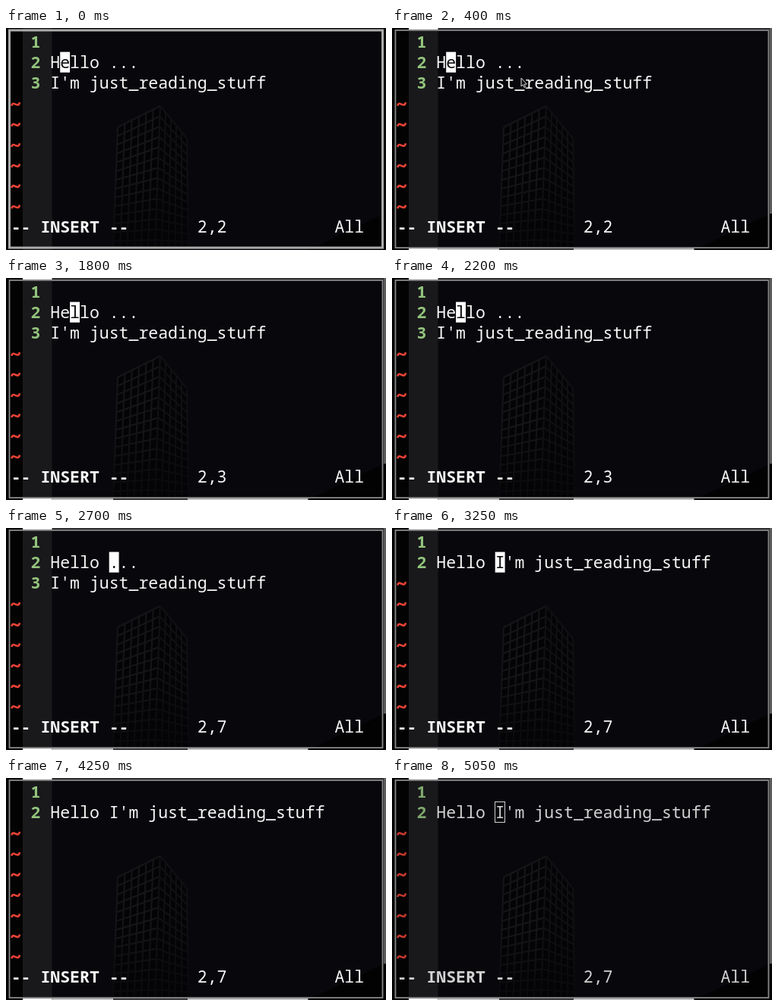
An HTML page with a canvas for the animation above (5.1 s loop, 500x293 px).

```html
<!DOCTYPE html>
<html>
<head>
<meta charset="utf-8">
<style>
html, body { margin: 0; width: 100%; height: 100%; overflow: hidden; background: #08070c; }
canvas { display: block; }
</style>
</head>
<body>
<canvas id="stage" width="500" height="293"></canvas>
<script>
const ctx = document.getElementById('stage').getContext('2d');
const LOOP = 5100, CELL = 12.9, ROW = 27.1, LEFT = 6.7, TOP = 5, TEXT_COL = 4;
const GREEN = '#93c47d', RED = '#ea4335', WHITE = '#f8f8f8';

const clamp = v => Math.max(0, Math.min(1, v));
const mix = (a, b, k) => a + (b - a) * k;
const since = (times, t) => times.filter(s => t >= s).length;

function rect(color, x, y, w, h) {
  ctx.fillStyle = color;
  ctx.fillRect(x, y, w, h);
}

function polygon(points, fill, stroke) {
  ctx.beginPath();
  points.forEach(([x, y]) => ctx.lineTo(x, y));
  ctx.closePath();
  ctx.fillStyle = fill;
  ctx.fill();
  if (stroke) {
    ctx.strokeStyle = stroke;
    ctx.lineWidth = 1;
    ctx.stroke();
  }
}

function write(text, col, row, color, bold) {
  ctx.font = `${bold ? 700 : 400} 21.5px "Noto Sans Mono", monospace`;
  ctx.fillStyle = color;
  ctx.fillText(text, LEFT + col * CELL, TOP + row * ROW + 21);
}

// Heavy tilde that marks the rows below the text
function tilde(row) {
  const y = TOP + row * ROW + 14;
  ctx.strokeStyle = RED;
  ctx.lineWidth = 2.6;
  ctx.beginPath();
  ctx.moveTo(7.4, y + 2.4);
  ctx.bezierCurveTo(9, y - 6, 16, y + 7, 18, y - 2.2);
  ctx.stroke();
}

// One side of the tower: a window grid between two upright edges
function face([ax, ay, ax2], [bx, by, bx2], cols, color) {
  const bottom = 293;
  const at = (u, v) => [
    mix(mix(ax, ax2, v), mix(bx, bx2, v), u),
    mix(mix(ay, by, u), bottom, v)
  ];
  polygon([at(0, 0), at(1, 0), at(1, 1), at(0, 1)], '#040406');
  const fade = ctx.createLinearGradient(0, 103, 0, 293);
  fade.addColorStop(0, color);
  fade.addColorStop(0.5, color);
  fade.addColorStop(1, '#09080a');
  ctx.strokeStyle = fade;
  ctx.lineWidth = 2;
  ctx.beginPath();
  const line = (p, q) => { ctx.moveTo(...p); ctx.lineTo(...q); };
  for (let i = 0; i <= cols; i++) line(at(i / cols, 0), at(i / cols, 1));
  for (let i = 0; i <= 14; i++) line(at(0, i / 14), at(1, i / 14));
  ctx.stroke();
}

function drawBackdrop(t) {
  rect('#08070c', 0, 0, 500, 293);
  rect('#030304', 0, 0, 22, 293);
  rect('#19191b', 22, 0, 38.5, 293);
  face([147, 131, 141], [203, 103, 196], 6, '#161416');
  face([203, 103, 196], [238, 146, 240], 5, '#100f11');
  polygon([[398, 293], [500, 244], [500, 293]], '#020203');

  // Bright wallpaper shows around the window
  const glow = 1 - clamp((t - 100) / 150);
  ctx.globalAlpha = 1 - glow;
  rect('#3a3a3c', 60, 0, 440, 1.5);
  rect('#ffffff', 22, 0, 38.5, 2);
  rect('#ffffff', 22, 291, 38.5, 2);
  rect('#c4c4c6', 60.5, 291, 337, 2);
  rect('#3c3c3e', 141, 291, 98, 2);
  rect('#5c5c5e', 497, 0, 3, 245);
  ctx.globalAlpha = 1;
  const shade = Math.round(mix(136, 172, glow));
  ctx.strokeStyle = `rgb(${shade},${shade},${shade})`;
  ctx.lineWidth = mix(1.8, 3, glow);
  ctx.strokeRect(4.5, 3, 491, 287);
}

function drawCursor(col, char, t) {
  const x = LEFT + (TEXT_COL + col - 1) * CELL, y = TOP + ROW;
  if (t >= 4700) {
    ctx.strokeStyle = WHITE;
    ctx.lineWidth = 1;
    ctx.strokeRect(Math.round(x) - 0.5, 31.5, 13, 27);
  } else if (!(t >= 1200 && t < 1800) && !(t >= 3800 && t < 4400)) {
    rect('#ffffff', x, y - 0.5, CELL, ROW);
    write(char, TEXT_COL + col - 1, 1, '#0b0a0e');
  }
}

// Pointer stops: time, x, y
const path = [
  [150, 262, 128], [400, 170, 66], [650, 205, 72], [900, 160, 60],
  [1150, 125, 47], [1350, 125, 47], [1700, 88, 44], [1800, 88, 44]
];

function drawPointer(t) {
  const i = path.findIndex(([time]) => time > t);
  if (i < 1) return;
  const [t0, x0, y0] = path[i - 1], [t1, x1, y1] = path[i];
  let k = (t - t0) / (t1 - t0);
  k = k * k * (3 - 2 * k);
  ctx.save();
  ctx.translate(mix(x0, x1, k), mix(y0, y1, k));
  polygon([[0, 0], [0, 11], [2.4, 8.8], [4, 12.5], [5.7, 11.7], [4.1, 8.2], [7.3, 8]], '#111114', '#d8d8d8');
  ctx.restore();
}

function draw(t) {
  drawBackdrop(t);
  const column = t < 1800 ? 2 : 3 + since([2400, 2500, 2600, 2700], t);
  const deleted = since([2850, 2950, 3050], t);
  const joined = t >= 3200;
  const second = "I'm just_reading_stuff";
  const first = 'Hello ' + '...'.slice(deleted) + (joined ? second : '');
  const lines = joined ? ['', first] : ['', first, second];

  ctx.globalAlpha = 1 - 0.16 * clamp((t - 4650) / 350);
  for (let row = 0; row < 9; row++) {
    if (row < lines.length) {
      write(String(row + 1), 2, row, GREEN, true);
      write(lines[row], TEXT_COL, row, WHITE);
    } else {
      tilde(row);
    }
  }
  write('-- INSERT --', 0, 9, WHITE, true);
  write('2,' + column, 19, 9, WHITE);
  write('All', 33, 9, WHITE);
  drawCursor(column, first[column - 1] || ' ', t);
  ctx.globalAlpha = 1;
  drawPointer(t);
}

function tick() {
  draw(performance.now() % LOOP);
  requestAnimationFrame(tick);
}
tick();
</script>
</body>
</html>
```
